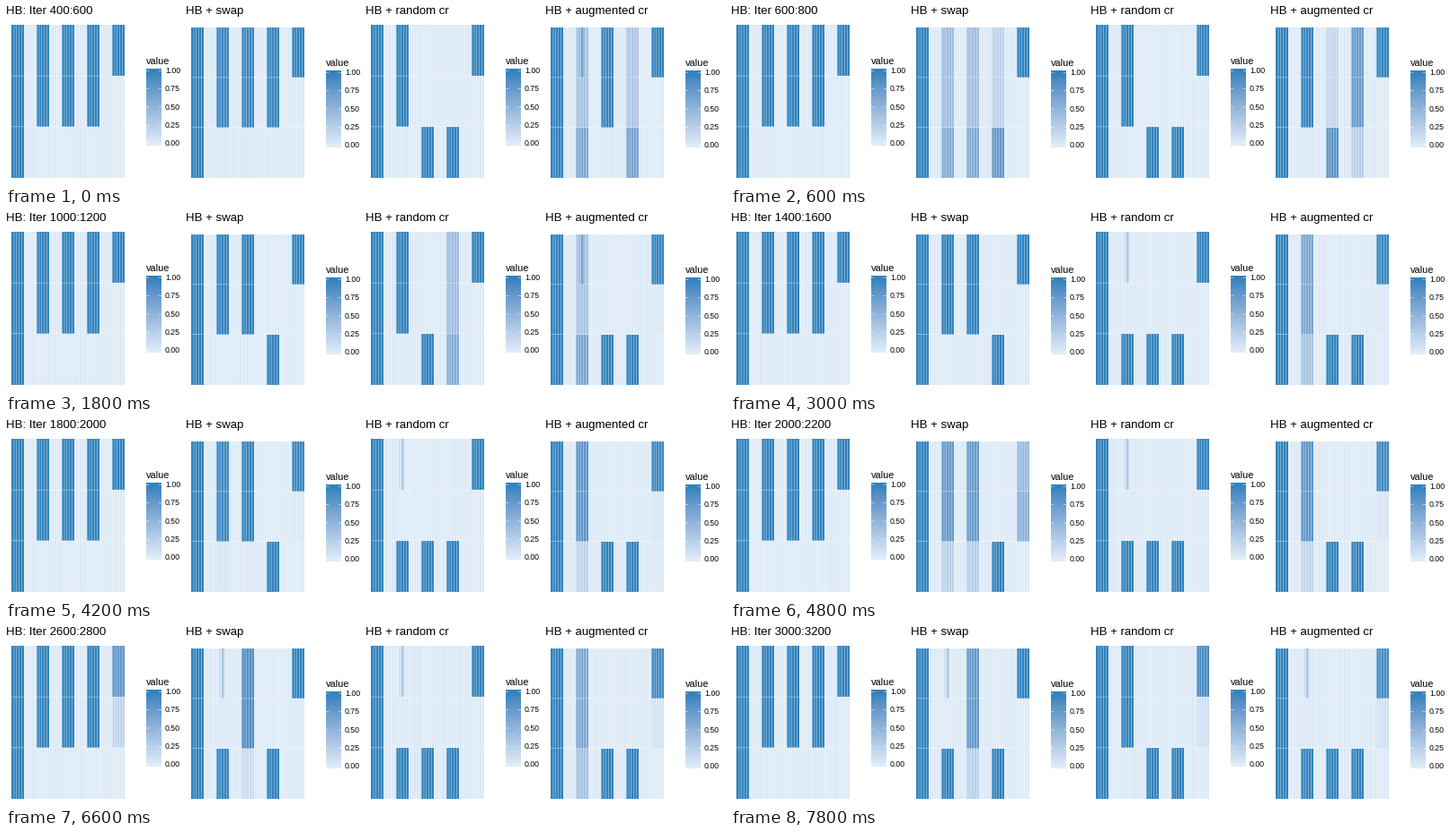
A matplotlib script that plays this animation: 800 px wide and 200 px high, repeating every 8000 ms.

```python
import numpy as np
import matplotlib.pyplot as plt
from matplotlib.animation import FuncAnimation
from matplotlib.colors import ListedColormap

plt.rcParams["font.family"] = "Liberation Sans"
PX = 0.72                     # points per pixel at 100 dpi
STEPS, HOLD = 14, 3           # a step lasts 600 ms, a frame 200 ms
GROUPS, WIDE = 9, 5           # column groups and columns in each
LOW, HIGH = (222, 235, 247), (49, 130, 189)

TO_XYZ = np.array([[0.4124, 0.3576, 0.1805],
                   [0.2126, 0.7152, 0.0722],
                   [0.0193, 0.1192, 0.9505]])
WHITE = TO_XYZ.sum(axis=1)
TO_LAB = np.array([[0, 116, 0], [500, -500, 0], [0, 200, -200]])


def rgb_to_lab(rgb):
    c = np.array(rgb) / 255
    linear = np.where(c > 0.04045, ((c + 0.055) / 1.055) ** 2.4, c / 12.92)
    return TO_LAB @ np.cbrt(TO_XYZ @ linear / WHITE)


def lab_to_rgb(lab):
    xyz = np.linalg.solve(TO_LAB, lab) ** 3 * WHITE
    linear = np.clip(np.linalg.solve(TO_XYZ, xyz), 0, 1)
    return np.where(linear > 0.0031308,
                    1.055 * linear ** (1 / 2.4) - 0.055, 12.92 * linear)


lab_low, lab_high = rgb_to_lab(LOW), rgb_to_lab(HIGH)
BLUES = ListedColormap([lab_to_rgb(lab_low + t * (lab_high - lab_low))
                        for t in np.linspace(0, 1, 256)])


def bump(s, at, height, width=0.6):
    """A short excursion centred on one step."""
    return height * np.exp(-((s - at) / width) ** 2)


def ease(s, at, width=0.2):
    """A lasting change from 0 to 1."""
    return 1 / (1 + np.exp((at - s) / width))


def always(s):
    return 1


# Each rule gives the share of the upper pattern in a column group at step s.
PANELS = [
    ("HB: Iter {}:{}", {
        2: always, 4: always, 6: always,
        8: lambda s: 1 - bump(s, 11, 0.2)}),
    ("HB + swap", {
        2: lambda s: 1 - bump(s, 1, 0.58) - ease(s, 8.7, 0.6),
        4: lambda s: (1 - bump(s, 1, 0.6) - bump(s, 8, 0.25)
                      - 0.25 * ease(s, 11, 0.8)),
        6: lambda s: 1 - ease(s, 0.75),
        8: lambda s: 1 - bump(s, 8, 0.55)}),
    ("HB + random cr", {
        2: lambda s: 1 - ease(s, 4) + ease(s, 12),
        4: lambda s: 0,
        6: lambda s: bump(s, 3, 0.42),
        8: lambda s: 1 - bump(s, 13, 0.09)}),
    ("HB + augmented cr", {
        2: lambda s: (0.8 - bump(s, 0, 0.4) + bump(s, 1, 0.36)
                      - bump(s, 3, 0.44, 2) - 0.8 * ease(s, 11.5, 0.4)),
        4: lambda s: 1 - ease(s, 0.7),
        6: lambda s: bump(s, 0.7, 0.9, 0.7),
        8: lambda s: 1 - 0.007 * s}),
]


def cells(index, step):
    """Values of the 3 x 45 tiles of one panel."""
    rng = np.random.default_rng(100 * index + step)
    grid = np.tile(rng.uniform(0, 0.025, GROUPS * WIDE), (3, 1))
    grid[:, :WIDE] = 1
    rules = PANELS[index][1]
    for group, rule in rules.items():
        q = np.clip(rule(step), 0, 1)
        column = (q, 1 - q, 0) if group == 8 else (q, q, 1 - q)
        part = slice(group * WIDE, (group + 1) * WIDE)
        grid[:, part] = np.maximum(np.array(column)[:, None],
                                   grid[:, part] * 0.6)
    if rules[2](step) < 0.4:      # a faint streak stays in the second signal
        middle = 2 * WIDE + 2
        grid[0, middle - 1] += 0.1
        grid[0, middle] += 0.33
    return np.clip(grid, 0, 1)


fig = plt.figure(figsize=(8, 2), dpi=100, facecolor="white")
ax = fig.add_axes([0, 0, 1, 1])
ax.axis("off")


def label(x, y, text, size):
    return ax.text(x, y, text, fontsize=size * PX, color="black")


def draw_legend(x, top):
    width, height = 17, 86
    half_bin = height / 40
    ramp = np.clip(np.linspace(1.026, -0.026, 100), 0, 1)[:, None]
    ax.imshow(ramp, cmap=BLUES, vmin=0, vmax=1, aspect="auto",
              extent=(x, x + width, top + height, top))
    label(x, top - 5.2, "value", 11)
    for value in np.linspace(0, 1, 5):
        y = top + half_bin + (1 - value) * (height - 2 * half_bin)
        for start in (x, x + width * 0.8):
            ax.plot([start, start + width / 5], [y, y], color="white",
                    lw=0.5 * PX, solid_capstyle="butt", snap=False)
        label(x + 21, y + 2.6, f"{value:.2f}", 8.8)


def draw_panel(index):
    plain = index % 2 == 0        # titles with descenders push the tiles down
    left, right = 200 * index + 6.2, 200 * index + 132.2
    top, bottom = 21.3 if plain else 24, 191.7
    xs = np.linspace(left, right, GROUPS * WIDE + 1)
    ys = np.linspace(top, bottom, 4)
    mesh = ax.pcolormesh(xs, ys, cells(index, 0), cmap=BLUES, vmin=0, vmax=1,
                         antialiased=True)
    line = dict(colors="white", lw=0.35 * PX, snap=False)
    ax.vlines(xs[1:-1], top, bottom, **line)
    ax.hlines(ys[1:-1], left, right, **line)
    title = label(200 * index, 9.4, PANELS[index][0], 13.2)
    draw_legend(200 * index + 156, 70 if plain else 72)
    return mesh, title


panels = [draw_panel(i) for i in range(len(PANELS))]
ax.set_xlim(0, 800)
ax.set_ylim(200, 0)


def update(frame):
    step = frame // HOLD
    for index, (mesh, _) in enumerate(panels):
        mesh.set_array(cells(index, step))
    start = 400 + 200 * step
    panels[0][1].set_text(PANELS[0][0].format(start, start + 200))
    return [artist for pair in panels for artist in pair]


# The last step is cut short, so the loop ends after 40 frames.
anim = FuncAnimation(fig, update, frames=STEPS * HOLD - 2, interval=200,
                     repeat=True, repeat_delay=0, blit=False)
plt.show()
```
